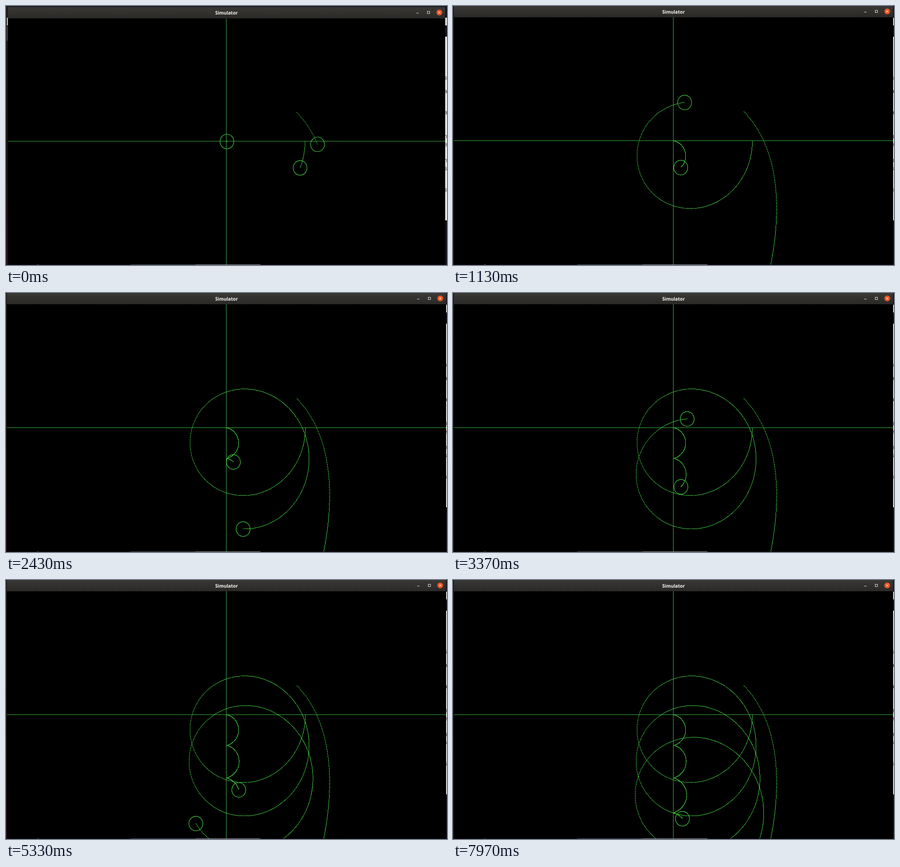
Write an HTML page with a canvas that moves like this. It is 976 by 574 pixels and loops after 8 s.

```html
<!DOCTYPE html>
<html lang="en">
<head>
<meta charset="utf-8">
<title>Simulator</title>
<style>
html, body { margin: 0; width: 100%; height: 100%; overflow: hidden; background: #000; }
canvas { display: block; }
</style>
</head>
<body>
<canvas id="stage" width="976" height="574"></canvas>
<script>
const ctx = document.getElementById('stage').getContext('2d');
const LOOP = 8000, FPS = 0.03;
const GREEN = '#42d042';
const STEP = 0.085;      // simulation time between two trail dots
const ASPECT = 1.05;     // pixels are slightly taller than wide
const MASS = 0.094;      // share of the lighter body in the pair

// Wall clock (ms) against simulation time: the simulator slows as trails grow.
const CLOCK = [[0, 5.4], [1130, 45.2], [2430, 89], [3370, 116.3],
               [5330, 172.8], [6530, 206.4], [8000, 245]];

function simTime(ms) {
  let i = 1;
  while (i < CLOCK.length - 1 && ms > CLOCK[i][0]) i++;
  const [t0, s0] = CLOCK[i - 1], [t1, s1] = CLOCK[i];
  return s0 + (s1 - s0) * (ms - t0) / (t1 - t0);
}

// Kepler ellipse whose far and near distances grow with every turn.
function orbit(angle) {
  const turn = angle / (2 * Math.PI);
  const far = 174.5 + 8.33 * turn, near = 105.9 + 3.25 * turn;
  const r = 2 * far * near / (far + near - (far - near) * Math.cos(angle));
  const p = 2 * far * near / (far + near);
  return { turn, r, pace: r * r / Math.sqrt(p) * (1 + 0.008 * turn) };
}

function bezier(a, b, c, d, t) {
  const u = 1 - t;
  return u * u * u * a + 3 * u * u * t * b + 3 * u * t * t * c + t * t * t * d;
}

// The third body flies past the pair and leaves, slowing down.
function flyby(time) {
  const s = Math.min(time, 39);
  const t = 0.0566 * s - 0.000713 * s * s;
  return [bezier(643, 711, 732.5, 702.5, t), bezier(234, 302, 424, 574, t)];
}

function buildPaths() {
  const N = 2000, d = 2 * Math.PI / N;
  let sum = 0;
  for (let i = 0; i < N; i++) sum += orbit((i + 0.5) * d).pace * d;
  const unit = 67.5 / sum;   // centre of mass falls 67.5 px in the first turn

  const heavy = [], light = [], comet = [];
  let angle = 0;
  for (let s = 0; s < 246; s += STEP) {
    const { turn, r } = orbit(angle);
    const dx = r * Math.cos(angle), dy = r * Math.sin(angle) * ASPECT;
    const cx = 503.8 + 0.88 * turn, cy = 299 + s;
    heavy.push([cx - MASS * dx, cy - MASS * dy]);
    light.push([cx + (1 - MASS) * dx, cy + (1 - MASS) * dy]);
    comet.push(flyby(s));

    const half = angle + STEP / (2 * unit * orbit(angle).pace);
    angle += STEP / (unit * orbit(half).pace);
  }
  return [heavy, light, comet];
}
const paths = buildPaths();

function rect(color, x, y, w, h) {
  ctx.fillStyle = color;
  ctx.fillRect(x, y, w, h);
}

function drawDesktop() {
  const side = ctx.createLinearGradient(0, 0, 0, 574);
  side.addColorStop(0, '#1c1c1c');
  side.addColorStop(0.5, '#17130f');
  side.addColorStop(1, '#2c1024');
  ctx.fillStyle = side;
  ctx.fillRect(0, 0, 976, 574);
  rect('#d8d8d8', 2, 26, 2, 17);
  rect('#5d8a94', 2, 45, 1, 32);
  rect('#14141f', 960, 0, 16, 574);
  rect('#d6d6d6', 960, 26, 16, 17);
  rect('#e4e4e4', 960, 68, 16, 407);
  ctx.fillStyle = '#333';
  ctx.font = '12px "Liberation Sans", sans-serif';
  ctx.textAlign = 'left';
  ctx.textBaseline = 'middle';
  [['s', 160], ['ar', 190], ['a', 237], ['n', 290], ['e', 308],
   ['i', 327], ['n', 343], ['si', 361], ['se', 408]]
    .forEach(([text, y]) => ctx.fillText(text, 970, y));
}

function drawTitleBar() {
  const bar = ctx.createLinearGradient(0, 0, 0, 25);
  bar.addColorStop(0, '#3a3835');
  bar.addColorStop(1, '#2b2927');
  ctx.fillStyle = bar;
  ctx.fillRect(2, 0, 972, 25.5);
  ctx.fillStyle = '#f4f4f2';
  ctx.font = 'bold 10.2px "Noto Sans", "Open Sans", sans-serif';
  ctx.textAlign = 'center';
  ctx.textBaseline = 'alphabetic';
  ctx.fillText('Simulator', 488, 16.5);

  rect('#e8e8e6', 910, 13, 5, 1);
  ctx.strokeStyle = '#e8e8e6';
  ctx.lineWidth = 1;
  ctx.strokeRect(934.5, 9.5, 5, 5);
  ctx.fillStyle = '#e95420';
  ctx.beginPath();
  ctx.arc(961, 12, 6.5, 0, 2 * Math.PI);
  ctx.fill();
  ctx.beginPath();
  ctx.moveTo(958.5, 9.5); ctx.lineTo(963.5, 14.5);
  ctx.moveTo(963.5, 9.5); ctx.lineTo(958.5, 14.5);
  ctx.strokeStyle = '#fff';
  ctx.stroke();
}

function drawBody(path, last) {
  ctx.fillStyle = GREEN;
  for (let i = 0; i <= last; i++) {
    const [x, y] = path[i];
    if (y < 574) ctx.fillRect(Math.round(x), Math.floor(y), 1, 1);
  }
  const [x, y] = path[last];
  if (y > 600) return;
  ctx.strokeStyle = GREEN;
  ctx.lineWidth = 1.2;
  ctx.beginPath();
  ctx.ellipse(x + 0.4, y + 0.3, 15.4, 16.2, 0, 0, 2 * Math.PI);
  ctx.stroke();
}

function drawScene(last) {
  ctx.save();
  ctx.beginPath();
  ctx.rect(2, 25, 972, 548);
  ctx.clip();
  rect('#000', 2, 25, 972, 548);
  rect('#3ab83a', 2, 298, 972, 1);
  rect('#4ab652', 487, 25, 1, 548);
  paths.forEach(path => drawBody(path, last));
  ctx.restore();
}

function draw(ms) {
  const frame = Math.floor((ms + 3.4) * FPS);
  const s = simTime(Math.min(frame / FPS, LOOP));
  const last = Math.min(Math.round(s / STEP), paths[0].length - 1);

  drawDesktop();
  // The window settles to full size in the first few frames.
  const scale = 1 - 0.0042 * Math.max(0, 1 - frame / 3);
  ctx.save();
  ctx.translate(487.5, 573);
  ctx.scale(scale, scale);
  ctx.translate(-487.5, -573);
  drawTitleBar();
  drawScene(last);
  ctx.restore();

  rect('#15101a', 0, 573, 976, 1);
  rect('#555', 68, 573, 5, 1);
  rect('#5c6670', 275, 573, 144, 1);
  rect('#a9adb0', 419, 573, 144, 1);
}

const start = performance.now();
function tick() {
  draw((performance.now() - start) % LOOP);
  requestAnimationFrame(tick);
}
tick();
</script>
</body>
</html>
```
